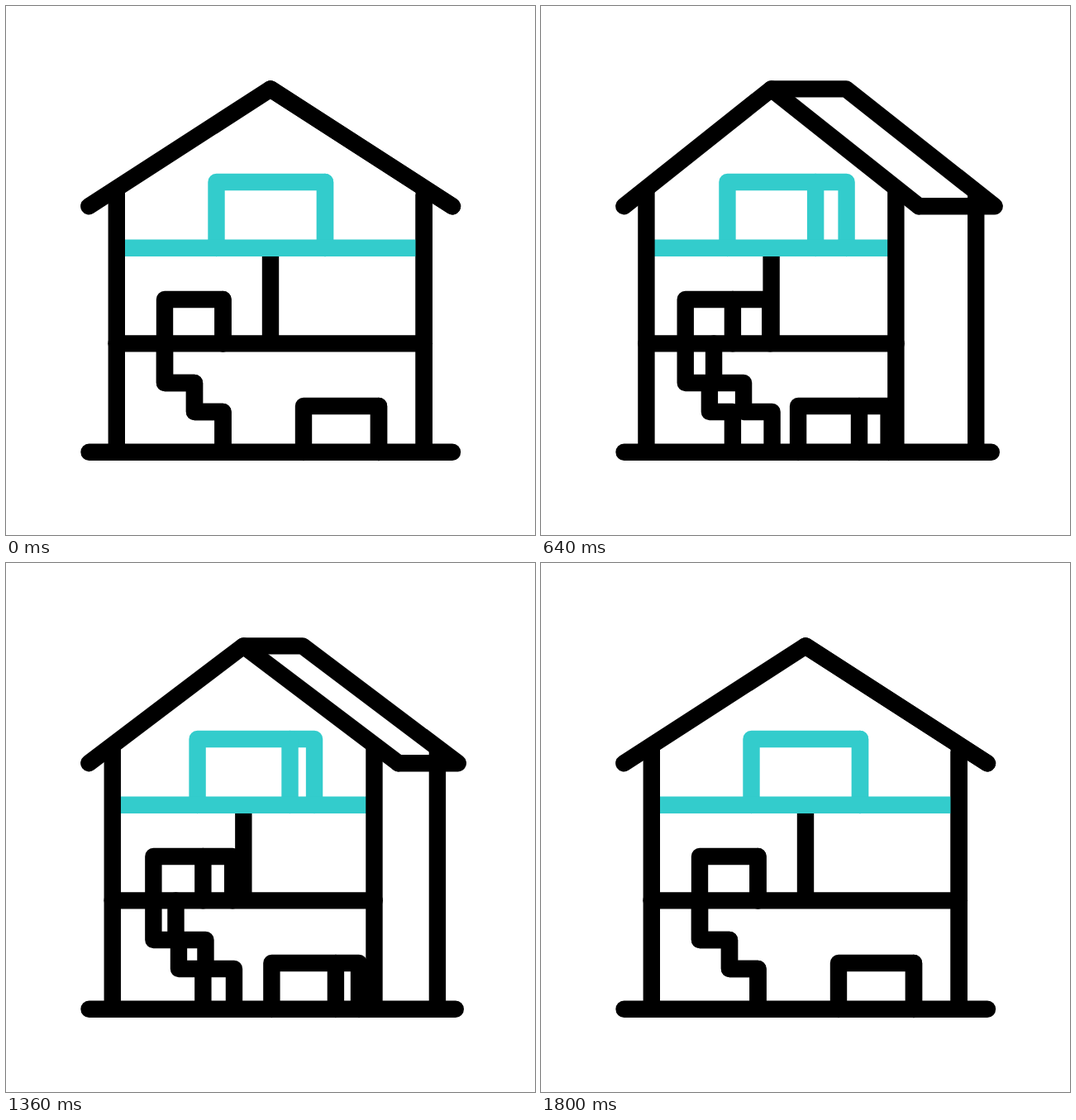
Write an HTML page without scripts that moves like this. It is 640 px wide and 640 px high and loops after 2000 ms.

```html
<!DOCTYPE html>
<html lang="en">
<head>
<meta charset="utf-8">
<title>House turning</title>
<style>
html, body { margin: 0; width: 100%; height: 100%; overflow: hidden; background: #fff; }
svg { display: block; width: 100%; height: 100%; }
path {
  fill: none;
  stroke: #000;
  stroke-width: 20.4;
  stroke-linecap: round;
  stroke-linejoin: round;
  d: var(--flat);
  animation: turn 2s infinite;
}
.butt { stroke-linecap: butt; }
.teal { stroke: #3cc; }

/* flat view, swing to the side, hold, swing back */
@keyframes turn {
  0% { d: var(--flat); animation-timing-function: linear; }
  10% { d: var(--flat); animation-timing-function: cubic-bezier(.27, 0, .1, 1); }
  40% { d: var(--side); animation-timing-function: linear; }
  50% { d: var(--side); animation-timing-function: cubic-bezier(.74, 0, .44, 1); }
  90%, 100% { d: var(--flat); }
}

/* far side */
.far-roof {
  --flat: path("M320 100.4L320 100.4L540 242.2L540 242.2");
  --side: path("M277.1 100.4L371 100.4L549 242.2L454.2 242.2");
}
.far-wall {
  --flat: path("M505.7 228L505.7 539.7");
  --side: path("M527 228L527 539.7");
}
.far-door {
  --flat: path("M262.5 355L262.5 355L262.5 408.4");
  --side: path("M230.8 355L277.8 355L277.8 408.4");
}
.far-stairs {
  --flat: path("M192 408.4L192 456L228 456L228 491L262.5 491L262.5 539.7");
  --side: path("M209.7 408.4L209.7 456L245.7 456L245.7 491L280.2 491L280.2 539.7");
}
.far-bed {
  --flat: path("M451 484L451 484L451 540");
  --side: path("M382.6 484L419.5 484L419.5 540");
}
.far-loft {
  --flat: path("M386 213L386 213L386 293");
  --side: path("M330.2 213L369 213L369 293");
}

/* near side */
.post {
  --flat: path("M320 293L320 408.4");
  --side: path("M277.1 293L277.1 408.4");
}
.loft {
  --flat: path("M254.5 293L254.5 213L386 213L386 293");
  --side: path("M224.4 293L224.4 213L330.2 213L330.2 293");
}
.ceiling {
  --flat: path("M133.8 292.8L505.7 292.8");
  --side: path("M127.2 292.8L426.6 292.8");
}
.stairs {
  --flat: path("M262.5 408.4L262.5 355L192 355L192 456L228 456L228 491L262.5 491L262.5 539.7");
  --side: path("M230.8 408.4L230.8 355L174.1 355L174.1 456L203 456L203 491L230.8 491L230.8 539.7");
}
.bed {
  --flat: path("M360 540L360 484L451 484L451 540");
  --side: path("M309.3 540L309.3 484L382.6 484L382.6 540");
}
.floor {
  --flat: path("M133.6 408.4L505.9 408.4");
  --side: path("M127.2 408.4L426.8 408.4");
}
.walls {
  --flat: path("M133.8 221L133.8 539.7M505.7 221L505.7 539.7");
  --side: path("M127.2 221L127.2 539.7M426.6 221L426.6 539.7");
}
.roof {
  --flat: path("M100.3 242.2L320 100.4L540 242.2");
  --side: path("M100.3 242.2L277.1 100.4L454.2 242.2");
}
.ground {
  --flat: path("M100.5 539.7L540 539.7");
  --side: path("M100.5 539.7L545 539.7");
}
</style>
</head>
<body>
<svg viewBox="0 0 640 640">
  <path class="far-roof"/>
  <path class="far-wall butt"/>
  <path class="far-door"/>
  <path class="far-stairs"/>
  <path class="far-bed"/>
  <path class="post butt"/>
  <path class="far-loft teal"/>
  <path class="loft teal"/>
  <path class="ceiling teal butt"/>
  <path class="stairs"/>
  <path class="bed"/>
  <path class="floor"/>
  <path class="walls butt"/>
  <path class="roof"/>
  <path class="ground"/>
</svg>
</body>
</html>
```
